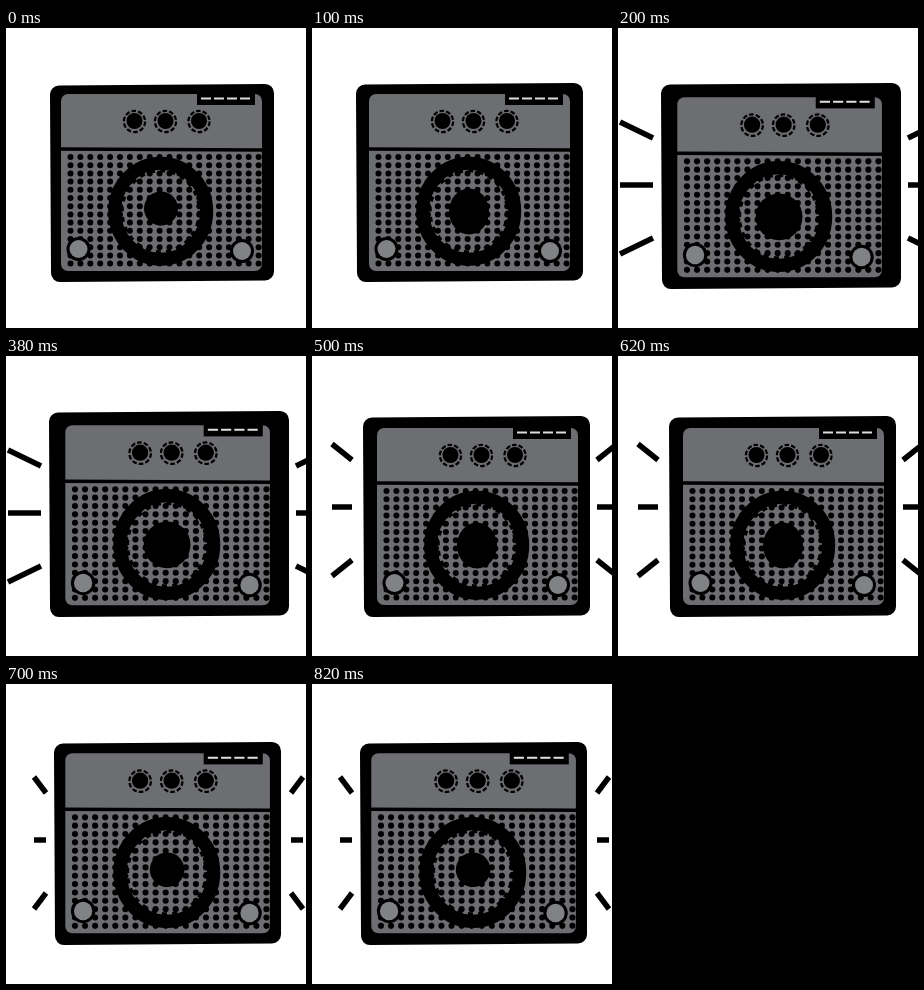
Write an HTML page with a canvas that moves like this. It is 300 px wide and 300 px high and loops after 0.9 s.

```html
<!DOCTYPE html>
<html>
<head>
<meta charset="utf-8">
<style>
html, body { margin: 0; height: 100%; overflow: hidden; background: #fff; }
canvas { display: block; width: 100vw; height: 100vh; }
</style>
</head>
<body>
<canvas width="300" height="300"></canvas>
<script>
const ctx = document.querySelector('canvas').getContext('2d');
const GREY = '#6d6e71';
const LOOP = 900;

// The cabinet jumps between held poses: outer box, then shift and scale of its front.
const poses = [
  { until: 100, box: [44, 56, 224, 198], shift: [0, 0], scale: 1 },
  { until: 200, box: [44, 55, 227, 199], shift: [2, 0], scale: 1 },
  { until: 500, box: [43, 55, 240, 206], shift: [3.3, 2], scale: 1.018, rays: { left: 35, right: 290, y: 157, length: 33 } },
  { until: 700, box: [51, 60, 227, 201], shift: [10, 6], scale: 1, rays: { left: 40, right: 285, y: 151, length: 20 } },
  { until: LOOP, box: [48, 58, 227, 203], shift: [3.3, 2], scale: 1.018, rays: { left: 40, right: 285, y: 156, length: 12 } }
];

function disc(x, y, rx, fill = '#000', ry = rx) {
  ctx.beginPath();
  ctx.ellipse(x, y, rx, ry, 0, 0, Math.PI * 2);
  ctx.fillStyle = fill;
  ctx.fill();
}

function ring(x, y, rx, ry, width, dash = []) {
  ctx.beginPath();
  ctx.ellipse(x, y, rx, ry, 0, 0, Math.PI * 2);
  ctx.lineWidth = width;
  ctx.setLineDash(dash);
  ctx.stroke();
  ctx.setLineDash([]);
}

function line(x1, y1, x2, y2, width) {
  ctx.beginPath();
  ctx.moveTo(x1, y1);
  ctx.lineTo(x2, y2);
  ctx.lineWidth = width;
  ctx.stroke();
}

function drawBody(x, y, w, h) {
  const r = 9;
  ctx.beginPath();
  ctx.moveTo(x + r, y + r + 1.5);
  ctx.lineTo(x + w - r, y + r);
  ctx.lineTo(x + w - r, y + h - r - 1.5);
  ctx.lineTo(x + r + 1, y + h - r);
  ctx.closePath();
  ctx.lineWidth = 2 * r;
  ctx.lineJoin = 'round';
  ctx.fillStyle = '#000';
  ctx.fill();
  ctx.stroke();
}

function drawFront(coneX, coneY) {
  ctx.fillStyle = GREY;
  ctx.beginPath();
  ctx.roundRect(55, 66, 201, 177, 7);
  ctx.fill();
  line(54, 121, 257, 122, 3.5);

  for (let y = 129; y < 240; y += 8.2)
    for (let x = 64.5; x < 254; x += 9.9) disc(x, y, 3);

  ctx.fillStyle = '#000';
  ctx.fillRect(191, 65, 58, 12);
  ctx.strokeStyle = '#ddd';
  for (let i = 0; i < 4; i++) line(195 + i * 13, 70.5, 205 + i * 13, 70.5, 2);
  ctx.strokeStyle = '#000';

  for (const x of [128.5, 159.5, 193]) {
    disc(x, 93, 8);
    ring(x, 93.5, 10.6, 10.6, 2.2, [4.6, 2.06]);
  }

  ring(154.7, 183.3, 46, 48, 13);
  ring(154.7, 183.3, 38.5, 40.5, 3, [5, 5.3]);
  disc(155, 172 + coneY / 2, coneX, '#000', coneY);

  for (const [x, y] of [[72.5, 221], [236, 223]]) {
    disc(x, y, 12);
    disc(x, y, 9, '#808285');
  }
}

// Three rays on each side, fanning outwards.
function drawRays({ left, right, y, length }) {
  for (const k of [-1, 0, 1]) {
    const start = y + 50 * k + 3 * k * k, end = start + 16 * k;
    line(left, start, left - length, end, 5.5);
    line(right, start, right + length, end, 5.5);
  }
}

function draw(time) {
  const index = poses.findIndex(p => time % LOOP < p.until);
  const { box, shift, scale, rays } = poses[index];
  const coneX = 23 - 3 * Math.abs(index - 2);
  const coneY = Math.min(23, 2 * coneX - 17);

  ctx.clearRect(0, 0, 300, 300);
  ctx.strokeStyle = '#000';
  drawBody(...box);
  ctx.save();
  ctx.translate(...shift);
  ctx.scale(scale, scale);
  drawFront(coneX, coneY);
  ctx.restore();
  if (rays) drawRays(rays);
}

function tick() {
  draw(performance.now());
  requestAnimationFrame(tick);
}
tick();
</script>
</body>
</html>
```
